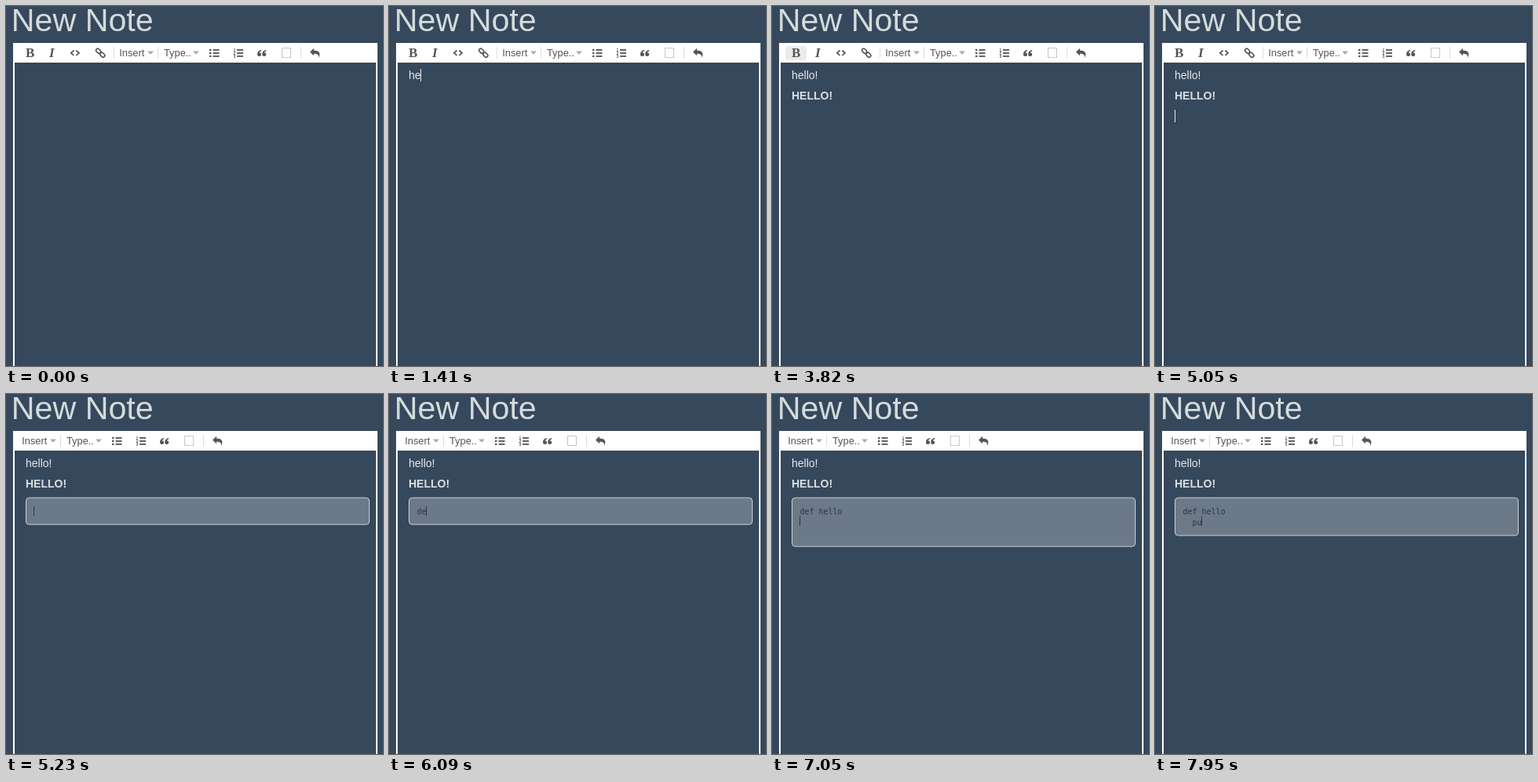
Recreate the animation shown at these times as an HTML page with a canvas. Size 480x458 px, loop 8 s.

```html
<!DOCTYPE html>
<html lang="en">
<head>
<meta charset="utf-8">
<title>Note editor</title>
<style>
html, body { margin: 0; width: 100%; height: 100%; overflow: hidden; background: #36485c; }
canvas { display: block; }
</style>
</head>
<body>
<canvas id="stage" width="480" height="458"></canvas>
<script>
const ctx = document.getElementById('stage').getContext('2d');
const LOOP = 8000;
const SANS = '"Liberation Sans", Arial, sans-serif';
const SERIF = '"Liberation Serif", serif';
const MONO = '"DejaVu Sans Mono", monospace';
const INK = '#555';

const steps = (start, gap, n) => Array.from({ length: n }, (_, i) => start + gap * i);

// Each line: text, position, style, caret span and the time of every key.
const lines = [
  { text: 'hello!', x: 25, y: 93, font: '14px ' + SANS, color: '#e6eaec',
    from: 0, top: 80, bottom: 96, keys: [...steps(1270, 80, 5), 1730] },
  { text: 'HELLO!', x: 25, y: 119, font: 'bold 14px ' + SANS, color: '#d9dee1',
    from: 2050, top: 105, bottom: 121, keys: [2590, 2730, 2860, 3050, 3090, 3270] },
  { text: '', x: 25, y: 145, font: '14px ' + SANS, color: '#e6eaec',
    from: 4050, top: 132, bottom: 148, keys: [] },
  { text: 'def hello', x: 35.4, y: 152.5, font: '10px ' + MONO, color: '#2f353c',
    from: 5230, top: 143, bottom: 155, keys: [5860, ...steps(6050, 84, 8)] },
  { text: '  pu', x: 35.4, y: 166.5, font: '10px ' + MONO, color: '#2f353c',
    from: 7050, top: 155, bottom: 168, keys: [7500, 7680, 7820, 7910] }
];
const caretOff = [[0, 450], [860, 1270], [3820, 4050], [4550, 5050], [5680, 5860]];
const BOLD_ON = 2320, BOLD_OFF = 4050, CODE = 5230, NEWLINE = 7050, INDENT = 7500;

function rect(x, y, w, h, color) {
  ctx.fillStyle = color;
  ctx.fillRect(x, y, w, h);
}

function label(text, x, y, font, color) {
  ctx.font = font;
  ctx.fillStyle = color;
  ctx.fillText(text, x, y);
}

function roundBox(x, y, w, h, r) {
  ctx.beginPath();
  ctx.roundRect(x, y, w, h, r);
}

function stroke(points, width = 1.7) {
  ctx.beginPath();
  points.forEach(([x, y]) => ctx.lineTo(x, y));
  ctx.strokeStyle = INK;
  ctx.lineWidth = width;
  ctx.stroke();
}

function triangle(x) {
  ctx.beginPath();
  ctx.moveTo(x, 57.5);
  ctx.lineTo(x + 8, 57.5);
  ctx.lineTo(x + 4, 61.8);
  ctx.fillStyle = '#aaa';
  ctx.fill();
}

const divider = x => rect(x, 52, 1, 15, '#ddd');

function linkIcon() {
  ctx.strokeStyle = INK;
  ctx.lineWidth = 1.6;
  for (const [x, y] of [[117.6, 57.2], [122.8, 62.2]]) {
    ctx.save();
    ctx.translate(x, y);
    ctx.rotate(Math.PI / 4);
    roundBox(-3.3, -2.2, 6.6, 4.4, 2.1);
    ctx.stroke();
    ctx.restore();
  }
}

function listIcon(x, numbered) {
  for (let i = 0; i < 3; i++) {
    const y = 55 + i * 4;
    rect(x + 4.5, y, 8, 1.8, INK);
    if (numbered) label(i + 1, x, y + 2.8, 'bold 5px ' + SANS, INK);
    else rect(x, y - 0.2, 2.4, 2.2, INK);
  }
}

function quoteIcon() {
  ctx.fillStyle = INK;
  for (const x of [320, 326.2]) {
    ctx.beginPath();
    ctx.moveTo(x + 5, 56);
    ctx.quadraticCurveTo(x, 56.5, x, 61.5);
    ctx.arc(x + 2.5, 61.5, 2.5, Math.PI, Math.PI * 1.7, true);
    ctx.quadraticCurveTo(x + 4.4, 59.2, x + 2.6, 59.2);
    ctx.quadraticCurveTo(x + 3, 57.7, x + 5, 57.4);
    ctx.fill();
  }
}

function checkIcon() {
  ctx.strokeStyle = '#aaa';
  ctx.lineWidth = 1;
  ctx.setLineDash([1.5, 0.8]);
  ctx.strokeRect(351.5, 53.5, 11, 12);
  ctx.setLineDash([]);
}

function replyIcon() {
  ctx.beginPath();
  ctx.moveTo(387, 58.5);
  ctx.lineTo(392, 53.8);
  ctx.lineTo(392, 56.4);
  ctx.bezierCurveTo(398, 56.4, 401.5, 59.5, 398, 66);
  ctx.bezierCurveTo(398.6, 62, 396.5, 60.7, 392, 60.7);
  ctx.lineTo(392, 63.3);
  ctx.closePath();
  ctx.fillStyle = INK;
  ctx.fill();
}

function formatTools(active) {
  if (active) {
    roundBox(17, 51, 27, 18, 4);
    ctx.fillStyle = '#ebebeb';
    ctx.fill();
  }
  label('B', 25, 65, 'bold 17px ' + SERIF, INK);
  label('I', 55, 65, 'italic bold 17px ' + SERIF, INK);
  stroke([[86.5, 56.5], [82.8, 59.7], [86.5, 62.9]]);
  stroke([[89.3, 56.5], [93, 59.7], [89.3, 62.9]]);
  linkIcon();
  divider(137);
}

function toolbar(t) {
  rect(9, 47, 464, 25, '#fff');
  ctx.save();
  if (t < CODE) formatTools(t >= BOLD_ON && t < BOLD_OFF);
  else ctx.translate(-124, 0);
  label('Insert', 144.3, 64, '12.8px ' + SANS, INK);
  triangle(180);
  divider(193);
  label('Type..', 201, 64, '12.8px ' + SANS, INK);
  triangle(238);
  listIcon(259, false);
  listIcon(289.5, true);
  quoteIcon();
  checkIcon();
  divider(375);
  replyIcon();
  ctx.restore();
}

function codeBox(t) {
  const rows = t < NEWLINE ? 0 : t < INDENT ? 2 : 1;
  roundBox(25.5, 132, 437, 34 + rows * 14, 4);
  ctx.fillStyle = '#6c7989';
  ctx.fill();
  ctx.strokeStyle = '#cdd1d6';
  ctx.lineWidth = 1;
  ctx.stroke();
}

function draw(t) {
  rect(0, 0, 480, 458, '#36485c');
  label('New Note', 6.8, 32, '41.2px ' + SANS, '#d5dbdb');
  rect(9, 47, 2, 411, '#fff');
  rect(471, 47, 2, 411, '#fff');
  toolbar(t);
  if (t >= CODE) codeBox(t);

  let caret;
  for (const line of lines) {
    if (t < line.from) break;
    const text = line.text.slice(0, line.keys.filter(k => k <= t).length);
    label(text, line.x, line.y, line.font, line.color);
    caret = { line, x: Math.floor(line.x + ctx.measureText(text).width) };
  }
  if (!caretOff.some(([a, b]) => t >= a && t < b)) {
    const { top, bottom, color } = caret.line;
    rect(caret.x, top, 1, bottom - top, color);
  }
}

const begin = performance.now();
function tick() {
  draw((performance.now() - begin) % LOOP);
  requestAnimationFrame(tick);
}
tick();
</script>
</body>
</html>
```
